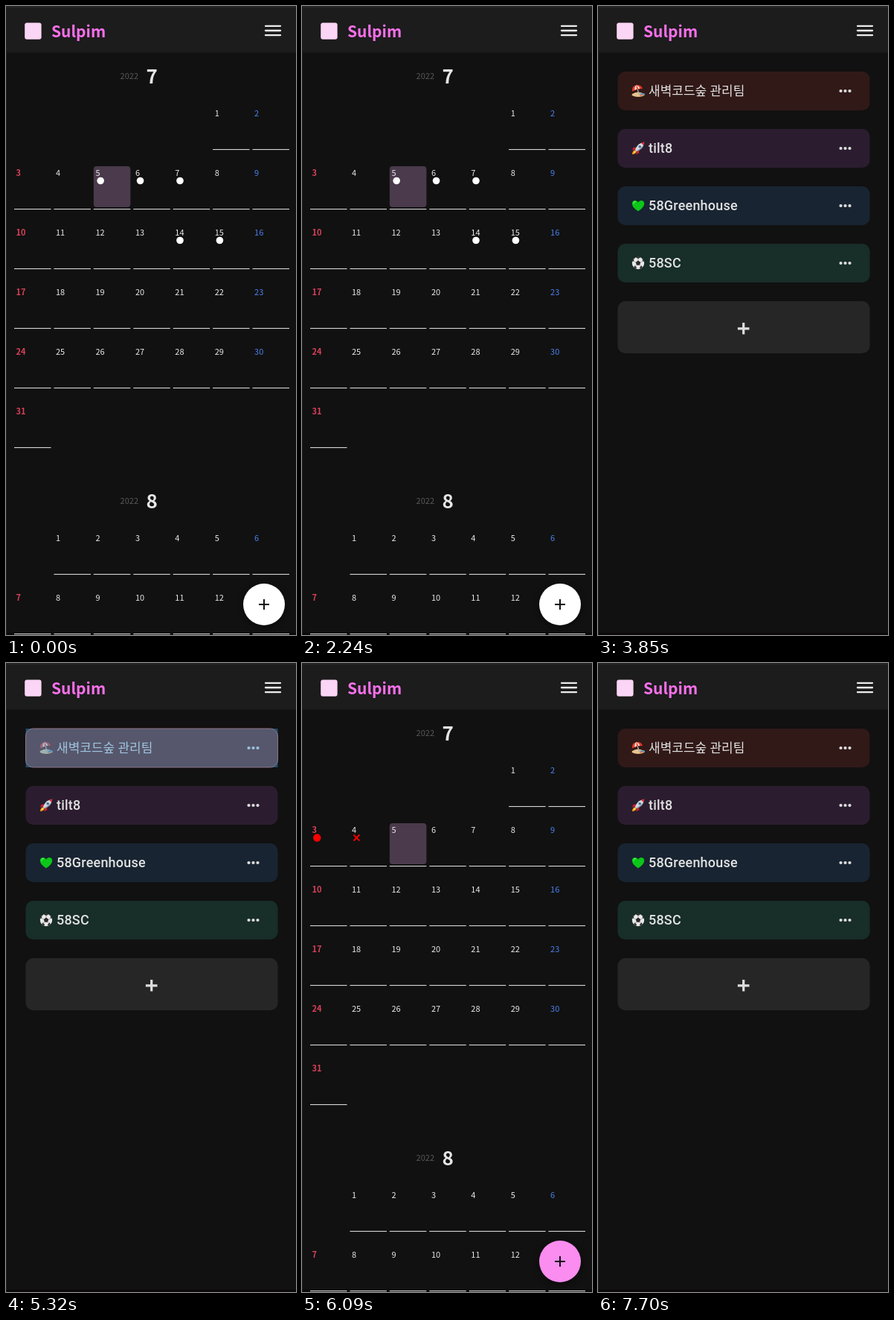
An HTML page for the animation above (8000 ms loop, 390 by 844 pixels).

```html
<!DOCTYPE html>
<html lang="ko">
<head>
<meta charset="utf-8">
<title>Calendar</title>
<style>
html, body { margin: 0; width: 100%; height: 100%; overflow: hidden; background: #111; }
svg { display: block; width: 390px; height: 844px; }
text { font-family: "Noto Sans CJK KR", "Noto Sans CJK JP", "Noto Sans CJK", sans-serif; white-space: pre; }
.day { font-size: 11px; font-weight: 400; }
.sun { font-weight: 700; }
.year { font-size: 11px; font-weight: 500; fill: #575757; }
.month { font-size: 26px; font-weight: 700; fill: #e6e6e6; }
.title { font-size: 21px; font-weight: 700; fill: #fb70ec; }
.label { font-family: Roboto, "Noto Sans CJK KR", "Noto Sans CJK JP", sans-serif; font-size: 18px; font-weight: 500; letter-spacing: .2px; fill: #e2e2e2; }
.hangul { font-size: 17px; font-weight: 400; letter-spacing: 0; }
.fab { filter: drop-shadow(0 3px 4px rgba(0,0,0,.45)); }
</style>
</head>
<body>
<svg id="stage" viewBox="0 0 390 844" xmlns="http://www.w3.org/2000/svg"></svg>
<script>
const LOOP = 8000, PITCH = 53.42, CELL = 49.5, ROW = 80, TINT = '#4298d6';

const rect = (x, y, w, h, fill, more = '') =>
  `<rect x="${x}" y="${y}" width="${w}" height="${h}" fill="${fill}" ${more}/>`;
const circle = (x, y, r, fill) => `<circle cx="${x}" cy="${y}" r="${r}" fill="${fill}"/>`;
const path = (d, fill, more = '') => `<path d="${d}" fill="${fill}" ${more}/>`;
const text = (x, y, cls, s, more = '') => `<text x="${x}" y="${y}" class="${cls}" ${more}>${s}</text>`;
const plus = (x, y, r, w, color) =>
  path(`M${x - r} ${y}h${2 * r}M${x} ${y - r}v${2 * r}`, 'none', `stroke="${color}" stroke-width="${w}"`);
const colX = c => 11 + PITCH * c;

// One month: heading, day numbers and an underline for every day
function month(name, top, firstCol, days) {
  let s = text(153.6, top + 35, 'year', '2022') + text(188.6, top + 41, 'month', name);
  for (let d = 1; d <= days; d++) {
    const i = firstCol + d - 1, c = i % 7, y = top + 84.5 + ROW * Math.floor(i / 7);
    if (y > 880) break;
    const color = c === 0 ? '#d8415a' : c === 6 ? '#4a80ec' : '#e9e9e9';
    s += text((colX(c) + 2.6).toFixed(1), y, c ? 'day' : 'day sun', d, `fill="${color}"`);
    s += rect(colX(c).toFixed(1), y + 44.5, CELL, 1.1, '#d6d6d6');
  }
  return s;
}

function calendar(marks, fabColor) {
  return rect(1, 62, 389, 779, '#111') +
    rect(colX(2), 215, CELL, 55, '#4a3a4b', 'rx="4"') +
    month(7, 63, 5, 31) + month(8, 633, 1, 31) + marks +
    `<g class="fab">${circle(347, 803, 28, fabColor)}</g>` + plus(347, 803, 7, 2, '#111');
}

const dot = ([c, row]) => circle(colX(c) + 9.3, 234.5 + ROW * row, 4.8, '#fff');
const ownMarks = [[2, 0], [3, 0], [4, 0], [4, 1], [5, 1]].map(dot).join('');
const groupMarks = circle(colX(0) + 9.2, 234.5, 5.2, '#f00') +
  path(`M${colX(1) + 5} 230.5l8 8m0 -8l-8 8`, 'none', 'stroke="#f00" stroke-width="1.8"');

// Small pictures on an 18 by 18 field
const icons = {
  beach:
    path('M1 13Q9 8 17 13L17.5 15Q9 19 .5 15Z', '#e8c48a') +
    path('M10 12L18 12.5L17.5 15Q13 15 10 12Z', '#4aa5d8') +
    path('M8 6L10.5 15', 'none', 'stroke="#b9b4ae" stroke-width="1.2"') +
    path('M1 9.5Q0 2.5 6.5 1.2Q13 .5 15 6Q8 5.5 1 9.5Z', '#e33a2c') +
    path('M4.4 7.7Q4 3 6.5 1.2Q10.5 2.5 11.2 5.8Q8 6 4.4 7.7Z', '#f5ead9') +
    path('M6.8 6.7L6.5 1.2Q8.6 3 9.2 6Z', '#e33a2c') +
    path('M11 14.5l4 -1.5l1 1.2l-4 1.6Z', '#e8593c'),
  rocket:
    path('M1 17Q1 12.5 4.5 11.5L6.7 13.6Q5.5 17 1 17Z', '#f6a21c') +
    path('M2.7 15.3Q3 13 5 12.4L5.8 13.2Q5 15 2.7 15.3Z', '#ffe25a') +
    path('M6.5 7.5L2.5 8L1 11.5L5 11.3ZM10.5 11.5L10 15.5L6.5 17L6.7 13Z', '#c8262e') +
    path('M4.8 11.5Q7 4 13.2 1.7L16.3 4.8Q14 11 6.5 13.2Z', '#d5dbe1') +
    path('M6 12.7Q12.5 9.5 16.3 4.8Q14 11 6.5 13.2Z', '#8f9aa6') +
    path('M13 1.8Q15.5 .7 17.4 .6Q17.3 2.7 16.3 5Z', '#d8323a') +
    circle(11.2, 6.8, 1.8, '#3d6f99'),
  heart:
    path('M9 16.5C5 13.5 .8 10.3 .8 6C.8 1.2 7 .6 9 4.6C11 .6 17.2 1.2 17.2 6C17.2 10.3 13 13.5 9 16.5Z', '#0cc718') +
    path('M3 6Q3.2 3.4 5.6 3.4', 'none', 'stroke="#5ff062" stroke-width="1.2" stroke-linecap="round"'),
  ball:
    circle(9, 9, 8.2, '#e9e9e9') +
    path('M9 5.6L12.3 8L11 11.8H7L5.7 8ZM5.8 1.5L9 3L12.2 1.5Q9 .2 5.8 1.5ZM1 7L3 6.5L3.4 3Q1.3 4.6 1 7ZM17 7L15 6.5L14.6 3Q16.7 4.6 17 7ZM3.2 14.6L4.2 12.4L6.8 14.3L6.4 16.7Q4.5 16.2 3.2 14.6ZM14.8 14.6L13.8 12.4L11.2 14.3L11.6 16.7Q13.5 16.2 14.8 14.6Z', '#2b2b2b') +
    path('M9 3V5.6M3 6.5L5.7 8M15 6.5L12.3 8M7 11.8L4.2 12.4M11 11.8L13.8 12.4', 'none', 'stroke="#777" stroke-width=".6"'),
};

const groups = [
  ['beach', '새벽코드숲 관리팀', '#311917', 'label hangul'],
  ['rocket', 'tilt8', '#2b1d2f', 'label'],
  ['heart', '58Greenhouse', '#182431', 'label'],
  ['ball', '58SC', '#182e28', 'label'],
];

function card([icon, name, fill, cls], i) {
  const y = 88 + 77 * i;
  return rect(26.5, y, 339, 52, fill, `rx="10" ${i ? '' : 'id="first"'}`) +
    `<g transform="translate(45 ${y + 17})">${icons[icon]}</g>` +
    text(68, y + 32.3, cls, name) +
    [326.5, 332.5, 338.5].map(x => circle(x, y + 26, 2.1, '#dedede')).join('');
}

const list = groups.map(card).join('') +
  rect(26.5, 396, 339, 70, '#262626', 'rx="10"') + plus(195.7, 432.8, 7.8, 3.2, '#dedede') +
  rect(26.5, 88, 339, 52, TINT, 'id="cardTap"');

const header = rect(0, 0, 390, 62.5, '#1c1c1c') + rect(0, 0, 390, 2.5, '#252525') +
  rect(25.2, 22.4, 22.4, 22.4, '#fbd5f5', 'rx="3"') + text(61, 42, 'title', 'Sulpim') +
  path('M349 26.8h20M349 33h20M349 39.2h20', 'none', 'stroke="#ececec" stroke-width="2.3" stroke-linecap="round"') +
  rect(21, 18, 110, 30, TINT, 'id="logoTap"');

const stage = document.getElementById('stage');
stage.innerHTML = rect(0, 0, 390, 844, '#111') + rect(0, 841, 390, 3, '#0c090a') +
  `<g id="list">${list}</g><g id="own">${calendar(ownMarks, '#fff')}</g>` +
  `<g id="group">${calendar(groupMarks, '#fb8cf0')}</g>` +
  header + rect(0, 0, 1, 844, '#1e1e1e');

const el = id => document.getElementById(id);
const show = (id, on) => el(id).setAttribute('display', on ? 'inline' : 'none');
const clamp = v => Math.min(1, Math.max(0, v));

// The CSS "ease" curve, solved by bisection
function ease(x) {
  const bez = (s, a, b) => 3 * (1 - s) ** 2 * s * a + 3 * (1 - s) * s * s * b + s ** 3;
  let lo = 0, hi = 1;
  for (let i = 0; i < 24; i++) {
    const m = (lo + hi) / 2;
    if (bez(m, .25, .25) < x) lo = m; else hi = m;
  }
  return bez(lo, .1, 1);
}

const HOME = [3485, 7125], LIST_DELAY = 155, TAP = 5305, SLIDE = 5473, SLIDE_MS = 500;

function draw(t) {
  const slide = ease(clamp((t - SLIDE) / SLIDE_MS));
  const listOn = (t >= HOME[0] + LIST_DELAY && t < SLIDE + SLIDE_MS) || t >= HOME[1] + LIST_DELAY;
  show('own', t < HOME[0]);
  show('list', listOn);
  show('group', t >= SLIDE && t < HOME[1]);
  el('group').setAttribute('transform', `translate(${(389 * (1 - slide)).toFixed(2)} 0)`);

  const pressed = t >= TAP && t < HOME[1];
  el('first').setAttribute('fill', pressed ? '#66281f' : groups[0][2]);
  el('first').setAttribute('stroke', pressed ? '#a56a70' : 'none');
  el('cardTap').setAttribute('opacity', pressed ? .42 * clamp((5480 - t) / 130) : 0);

  const since = t >= HOME[1] ? t - HOME[1] : t - HOME[0];
  el('logoTap').setAttribute('opacity', since < 0 ? 0 : .18 * clamp((170 - since) / 140));
}

const start = performance.now();
function tick() {
  draw((performance.now() - start) % LOOP);
  requestAnimationFrame(tick);
}
tick();
</script>
</body>
</html>
```
